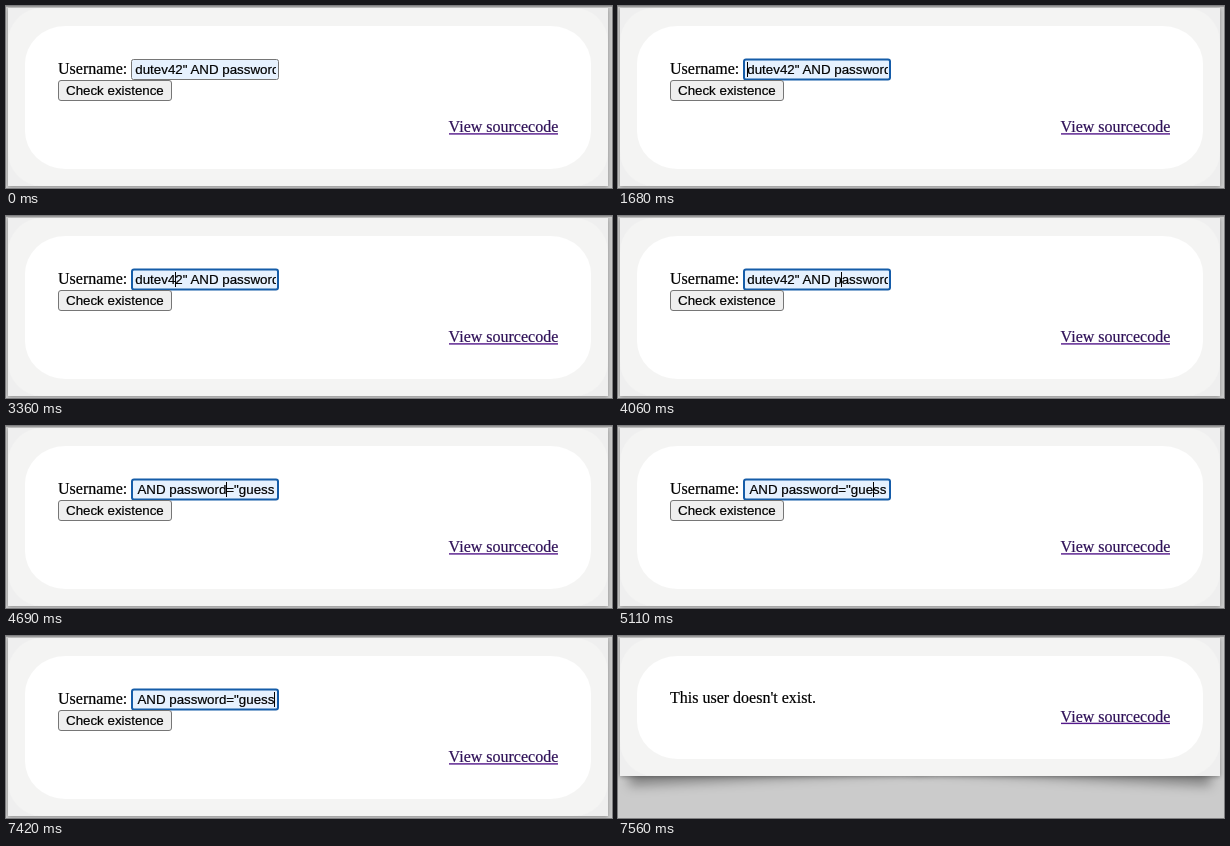
These frames come from a looping animation (606 by 182 pixels, 9.45 s). An HTML page:

```html
<!DOCTYPE html>
<html lang="en">
<head>
<meta charset="utf-8">
<title>Username check</title>
<style>
  html, body { margin: 0; width: 100%; height: 100%; overflow: hidden; background: #cbcbcb; }
  #stage { position: relative; width: 606px; height: 182px; overflow: hidden; background: #cbcbcb; }
  #stage > * { position: absolute; }
  .curl {
    bottom: 55px; width: 300px; height: 28px;
    box-shadow: 0 15px 12px rgba(0, 0, 0, .36);
  }
  .curl.left { left: 10px; transform: rotate(-3deg); }
  .curl.right { left: 294px; transform: rotate(3deg); }
  #panel {
    left: 2px; top: 2px; width: 600px; background: #efefef;
    box-shadow: 0 1px 4px rgba(0, 0, 0, .3);
  }
  #panel div { position: absolute; }
  #rim { inset: 0; border-radius: 34px; background: #f4f4f3; }
  #paper { inset: 18px 17px 17px; border-radius: 40px / 38px; background: #fff; }
  #edge { left: 0; top: 0; width: 606px; height: 1px; background: #999; }
  svg { left: 0; top: 0; }
  text { white-space: pre; stroke: currentColor; stroke-width: .2; }
  .serif { font: 16px "Liberation Serif", "Times New Roman", serif; }
  .sans { font: 13.333px "Liberation Sans", Arial, sans-serif; }
  .link { fill: #2f1158; color: #2f1158; }
</style>
</head>
<body>
<div id="stage">
  <div class="curl left"></div>
  <div class="curl right"></div>
  <div id="panel"><div id="rim"></div><div id="paper"></div></div>
  <div id="edge"></div>
  <svg width="606" height="182">
    <clipPath id="inner"><rect x="129" y="54" width="141" height="19"/></clipPath>
    <g id="form">
      <text class="serif" x="52" y="67.5">Username:</text>
      <rect id="field" rx="2" fill="#e6f1fe"/>
      <g clip-path="url(#inner)">
        <text id="value" class="sans" y="67.5"></text>
        <rect id="caret" y="56" width="1" height="15"/>
      </g>
      <rect x="52.5" y="74.5" width="113" height="20" rx="2.5" fill="#efefef" stroke="#767676"/>
      <text class="sans" x="60" y="89">Check existence</text>
    </g>
    <text id="result" class="serif" x="52" y="67">This user doesn't exist.</text>
    <g id="link">
      <text class="serif link" x="442.6" y="126">View sourcecode</text>
      <rect x="443" y="127.2" width="109" height="1.4" fill="#551a8b"/>
    </g>
  </svg>
</div>
<script>
const LOOP = 9450, FOCUS = 1680, SUBMIT = 7560;
const TEXT_LEFT = 129.3, SCROLL = 53, SCROLL_FROM = 21;
const $ = id => document.getElementById(id);
const value = $("value");
value.textContent = 'dutev42" AND password="guess';

// Caret steps: [time, character index], null while blinked off
const steps = [[FOCUS, 0], [2240, null], [2520, 1]];
let index = 1;
// Key-repeat bursts: [start, number of steps], 70 ms apart
for (const [start, count] of [[3010, 2], [3220, 3], [3500, 4], [3850, 5],
                              [4270, 5], [4690, 2], [4900, 4], [5250, 2]])
  for (let i = 0; i < count; i++) steps.push([start + i * 70, ++index]);
steps.push([5880, null], [6370, index], [6930, null], [7420, index]);
const scrollTime = steps.find(([, i]) => i === SCROLL_FROM)[0];

function setAttrs(el, attrs) {
  for (const name in attrs) el.setAttribute(name, attrs[name]);
}

function show(el, on) {
  el.style.display = on ? "" : "none";
}

function drawField(focused) {
  setAttrs($("field"), focused
    ? { x: 126, y: 53.5, width: 146, height: 20, stroke: "#155ca8", "stroke-width": 2 }
    : { x: 125.5, y: 53.5, width: 147, height: 20, stroke: "#767676", "stroke-width": 1 });
}

function drawCaret(t) {
  const step = steps.filter(([time]) => time <= t).pop();
  const at = step ? step[1] : null;
  const left = TEXT_LEFT - (t >= scrollTime ? SCROLL : 0);
  value.setAttribute("x", left);
  show($("caret"), at !== null);
  if (at !== null) {
    const advance = at ? value.getSubStringLength(0, at) : 0;
    $("caret").setAttribute("x", Math.floor(left + advance));
  }
}

function draw(t) {
  const submitted = t >= SUBMIT;
  show($("form"), !submitted);
  show($("result"), submitted);
  $("panel").style.height = (submitted ? 137.5 : 178) + "px";
  setAttrs($("link"), { transform: `translate(0 ${submitted ? -40.5 : 0})` });
  for (const curl of document.querySelectorAll(".curl")) show(curl, submitted);
  if (!submitted) {
    drawField(t >= FOCUS);
    drawCaret(t);
  }
}

const begin = performance.now();
function frame() {
  draw((performance.now() - begin) % LOOP);
  requestAnimationFrame(frame);
}
frame();
</script>
</body>
</html>
```
